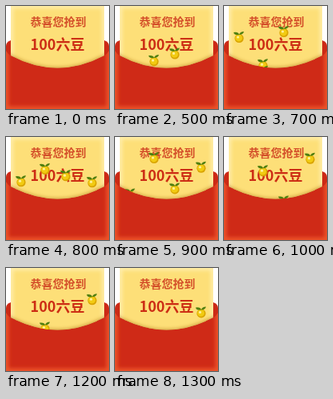
An HTML page that plays this animation: 129 by 129 pixels, repeating every 1400 ms.

```html
<!DOCTYPE html>
<html lang="zh">
<head>
<meta charset="utf-8">
<style>
  html, body { margin: 0; width: 100%; height: 100%; overflow: hidden; background: #fff; }
  svg { display: block; width: 100vw; height: 100vh; }
  text { font-family: "Noto Sans CJK SC", "Noto Sans CJK", sans-serif; text-anchor: middle; }
</style>
</head>
<body>
<svg viewBox="0 0 129 129">
  <defs>
    <filter id="soft" x="-20%" y="-20%" width="140%" height="140%">
      <feGaussianBlur stdDeviation="2.5"/>
    </filter>
    <clipPath id="card"><rect x="6" width="117" height="80"/></clipPath>
    <path id="pocket" d="M0 129V56Q2 60 6 62Q64.5 93 123 62Q127 60 129 56V129Z"/>
    <clipPath id="front"><use href="#pocket"/></clipPath>
    <g id="fruit">
      <circle cy="1.5" r="5.6" fill="#d9a400"/>
      <circle cx="-.4" cy="1" r="4.4" fill="#f2cb12"/>
      <circle cx="-1.5" cy="0" r="1.6" fill="#fff09a"/>
      <path d="M0-3Q-6-2-7-6Q-1-7 0-3Q1-7 6-7Q5-3 0-3" fill="#4f7f10"/>
    </g>
  </defs>
  <path d="M0 129V50Q0 45 6 43H123Q129 45 129 50V129Z" fill="#cc2a16"/>
  <g clip-path="url(#card)">
    <rect x="6" width="117" height="80" fill="#fddf78"/>
    <path d="M6 80V0H123V80" fill="none" stroke="#fff0b4" stroke-width="5" filter="url(#soft)"/>
    <use href="#pocket" fill="#a86a14" opacity=".75" filter="url(#soft)"/>
  </g>
  <text x="65.5" y="25" font-size="14" font-weight="700" fill="#d4502a">恭喜您抢到</text>
  <text x="64.5" y="55" font-size="18" font-weight="900" fill="#cc2c14">100六豆</text>
  <g id="fruits"></g>
  <g clip-path="url(#front)">
    <use href="#pocket" fill="#cf2a17"/>
    <path d="M0 50V129H129V50" fill="none" stroke="#f0582c" stroke-width="6" filter="url(#soft)"/>
  </g>
</svg>
<script>
  const LOOP = 1400, STEP = 100, HIDDEN_Y = 82, FALL_SPEED = 0.162;
  const hops = [
    { x: 75, start: 430, top: 700, topY: 32 },
    { x: 49, start: 450, top: 600, topY: 57 },
    { x: 19, start: 500, top: 700, topY: 39 },
    { x: 49, start: 700, top: 900, topY: 26 },
    { x: 108, start: 700, top: 1100, topY: 23 }
  ];
  const layer = document.getElementById("fruits");

  // Decelerating rise out of the pocket, then a steady fall back
  function height({ start, top, topY }, time) {
    if (time >= top) return topY + (time - top) * FALL_SPEED;
    const left = (top - time) / (top - start);
    return topY + (HIDDEN_Y - topY) * left * left;
  }

  function draw() {
    const time = Math.floor(performance.now() % LOOP / STEP) * STEP;
    layer.innerHTML = hops
      .filter(hop => time >= hop.start)
      .map(hop => [hop.x, height(hop, time)])
      .filter(([, y]) => y <= HIDDEN_Y)
      .map(([x, y]) => `<use href="#fruit" x="${x}" y="${y}"/>`)
      .join("");
    requestAnimationFrame(draw);
  }
  draw();
</script>
</body>
</html>
```
